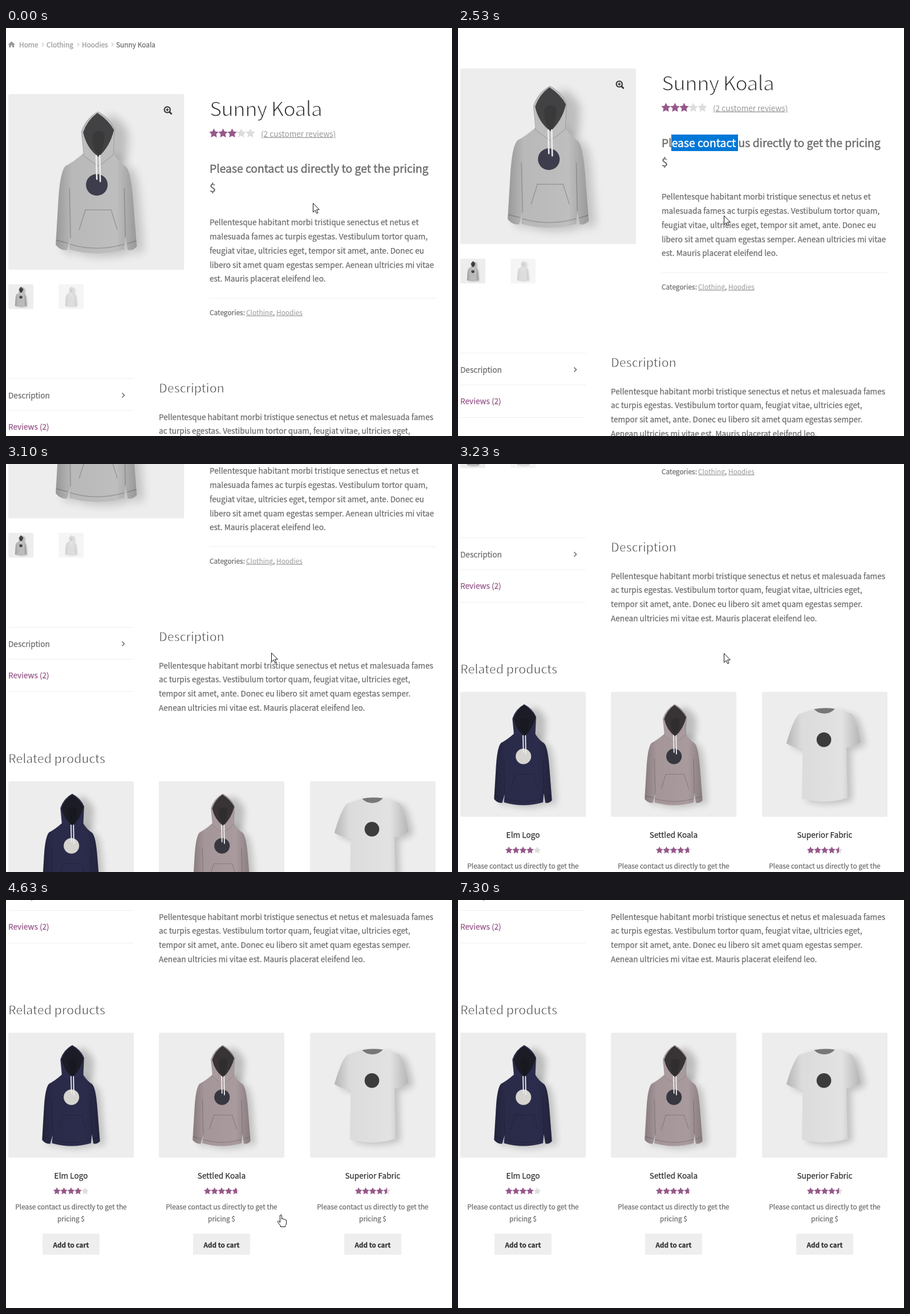
Animation of 782x716 px, one loop 7460 ms. Source, as an HTML page:

```html
<!DOCTYPE html>
<html lang="en">
<head>
<meta charset="utf-8">
<title>Product page</title>
<style>
html, body { margin: 0; width: 100%; height: 100%; overflow: hidden; background: #fff; }
svg { display: block; }
text { font-family: "Noto Sans CJK JP", "Noto Sans CJK SC", "Noto Sans CJK", "Open Sans", sans-serif; white-space: pre; stroke-width: .25px; }
/* A white outline thins the regular weight to a light one. */
.light { font-weight: 300; stroke: #fff; stroke-width: .035em; }
.medium { stroke-width: .5px; }
.link { text-decoration: underline; text-decoration-thickness: 1px; stroke: none; }
</style>
</head>
<body>
<svg id="stage" width="782" height="716" viewBox="0 0 782 716">
  <defs>
    <filter id="blur" x="-30%" y="-30%" width="160%" height="160%"><feGaussianBlur stdDeviation="8"/></filter>
    <linearGradient id="shade">
      <stop offset="0" stop-opacity=".2"/><stop offset=".2" stop-opacity=".03"/>
      <stop offset=".75" stop-opacity="0"/><stop offset="1" stop-opacity=".2"/>
    </linearGradient>
    <clipPath id="selectionClip"><rect id="selectionBox" x="374" y="232" width="0" height="29"/></clipPath>
  </defs>
  <g id="page"></g>
  <g id="cursor" stroke-linejoin="round">
    <path id="arrow" d="M.5.5V16.3L4.2 12.8 6.6 18.4 9 17.4 6.6 11.8H11.3Z" fill="#fff" stroke="#111"/>
    <path id="beam" d="M-3.5-7.5H-1L0-6.5 1-7.5H3.5M0-6.5V6.5M-3.5 7.5H-1L0 6.5 1 7.5H3.5" fill="none" stroke="#111" stroke-width="1.2"/>
    <path id="hand" d="M-1.5 14V2Q-1.5.5 0 .5T1.5 2V8Q2 6.8 3.2 7T4.4 8.6Q5 7.6 6 8T7.2 9.6Q8 8.8 9 9.4T9.6 11V15Q9.6 18 7.6 19.5V21.5H-.5V20L-5 14Q-6.2 12.2-5 11.4T-2.8 12.2Z" fill="#fff" stroke="#111"/>
  </g>
</svg>
<script>
const LOOP = 7460;
const BODY = 13.64, SMALL = 11.9, PRICE = 19.3, HEADING = 21.45;
const GREY = '#6d6d6d', PALE = '#999', DARK = '#333', PURPLE = '#96588a', RULE = '#f0f0f0';
const $ = id => document.getElementById(id);

const text = (x, y, size, fill, content, extra = '') =>
  `<text x="${x}" y="${y + .6}" font-size="${size}" fill="${fill}" stroke="${fill}" ${extra}>${content}</text>`;
const centred = (x, y, size, fill, content, extra = '') =>
  text(x, y, size, fill, content, 'text-anchor="middle" ' + extra);
const lines = (x, y, rows) =>
  rows.map((row, i) => text(x, y + i * 24.8, BODY, GREY, row)).join('');
const rule = (x, y, width) => `<rect x="${x}" y="${y}" width="${width}" height="1" fill="${RULE}"/>`;
const chevron = (x, y, size, color, weight) =>
  `<path d="M${x} ${y - size}l${size} ${size}l${-size} ${size}" fill="none" stroke="${color}" stroke-width="${weight}"/>`;

function stars(x, y, pitch, rating) {
  const radius = pitch * .54, id = `rating${x}`;
  let d = '';
  for (let s = 0; s < 5; s++) {
    for (let k = 0; k < 10; k++) {
      const r = k % 2 ? radius * .5 : radius, a = k * Math.PI / 5;
      const px = x + pitch * (s + .5) + r * Math.sin(a), py = y - r * Math.cos(a);
      d += `${k ? 'L' : 'M'}${px.toFixed(2)} ${py.toFixed(2)}`;
    }
    d += 'Z';
  }
  const stop = rating / 5;
  return `<linearGradient id="${id}"><stop offset="${stop}" stop-color="${PURPLE}"/>` +
    `<stop offset="${stop}" stop-color="#ddd"/></linearGradient><path d="${d}" fill="url(#${id})"/>`;
}

const picture = (x, y, size, content, opacity = 1) =>
  `<svg x="${x}" y="${y}" width="${size}" height="${size}" viewBox="0 0 308 308" opacity="${opacity}">
    <rect width="308" height="308" rx="${3 * 308 / size}" fill="#ededed"/>${content}</svg>`;

const shadow = (d, dx, opacity) =>
  `<path d="${d}" transform="translate(${dx} 6)" opacity="${opacity}" filter="url(#blur)"/>`;
const garment = (d, color) =>
  shadow(d, 12, .18) + `<path d="${d}" fill="${color}"/><path d="${d}" fill="url(#shade)"/>`;

function hoodie(color, lining, emblem = '') {
  const hood = 'M157 31Q136 42 128 66L132 108Q150 122 158 126Q170 118 184 106L186 62Q178 42 157 31Z';
  const body = 'M131 104Q114 119 100 126Q91 136 88 180L83 264Q92 275 103 273L109 252L107 272Q155 286 203 272' +
    'L205 250L209 273Q218 275 225 267L219 190Q215 136 206 127Q194 120 184 104Z';
  return shadow(hood, 24, .2) + garment(body, color) +
    `<path d="M107 165L109 252M203 165L205 250M124 238L135 203H180L191 238M108 263Q155 277 203 263M84 256L104 261M208 262L224 257"
       fill="none" stroke="#000" stroke-opacity=".2" stroke-width="1.5"/>
     <path d="${hood}" fill="${color}" stroke="#000" stroke-opacity=".18"/>
     <path d="M156 33Q138 46 131 67Q137 95 158 110Q178 92 185 63Q176 46 156 33Z" fill="${lining}"/>
     <path d="M158 110Q144 90 148 70Q156 60 168 68Q170 92 158 110Z" opacity=".14"/>${emblem}
     <path d="M154 108L155 149M160 108L161 153" stroke="#eee" stroke-width="2.6" stroke-linecap="round"/>`;
}

const tee = garment('M129 43Q105 50 91 55Q76 70 60 127Q76 138 100 141L98 263Q154 278 210 261L207 138Q228 135 242 124' +
    'Q234 76 220 54L178 42Q153 58 129 43Z', '#e2e2e2') +
  `<path d="M128 43Q153 38 179 42Q170 53 153 54Q136 53 128 43Z" fill="#777"/>
   <circle cx="152" cy="118" r="18" fill="#3c3c3c"/>`;

const disc = (color, r) => `<circle cx="155" cy="159" r="${r}" fill="${color}"/>`;
const greyHoodie = hoodie('#bebebe', '#424244', disc('#3d3d4d', 19));

function card(x, name, rating, content) {
  const cx = x + 110;
  return picture(x, 885.5, 220, content) +
    centred(cx, 1141.5, BODY, DARK, name) +
    stars(x + 79, 1164, 12.4, rating) +
    centred(cx, 1195.5, SMALL, GREY, 'Please contact us directly to get the') +
    centred(cx, 1216.5, SMALL, GREY, 'pricing $') +
    `<rect x="${x + 60}" y="1238.5" width="100" height="37" fill="#eee"/>` +
    centred(cx, 1262, 11.7, DARK, 'Add to cart', 'font-weight="600"');
}

const price = fill =>
  text(357, 253, PRICE, fill, 'Please contact us directly to get the pricing', 'class="medium"');

$('page').innerHTML = [
  `<path d="M3.5 29L9.7 23.5 16 29H14.2V34H11V30.5H8.5V34H5.3V29Z" fill="${PALE}"/>`,
  text(23, 33.5, SMALL, PALE, 'Home'), chevron(63, 29, 3, '#ccc', 1.2),
  text(71, 33.5, SMALL, PALE, 'Clothing'), chevron(125, 29, 3, '#ccc', 1.2),
  text(133, 33.5, SMALL, PALE, 'Hoodies'), chevron(185, 29, 3, '#ccc', 1.2),
  text(193, 33.5, SMALL, GREY, 'Sunny Koala'),

  picture(4, 116, 308.5, greyHoodie),
  `<g fill="none" stroke="#333" stroke-width="2"><circle cx="282.8" cy="143.4" r="5.2"/>
   <path d="M286.6 147.2L290.6 151.2" stroke-width="2.8"/><path d="M280.1 143.4h5.4M282.8 140.7v5.4" stroke-width="1.5"/></g>`,
  picture(4, 449.5, 44, greyHoodie),
  picture(92, 449.5, 44, hoodie('#c0c0c0', '#b4b4b4'), .5),

  text(357, 154.5, 35.8, DARK, 'Sunny Koala', 'class="light" letter-spacing="-1"'),
  stars(356.5, 185, 16, 3),
  text(447, 190, BODY, PALE, '(2 customer reviews)', 'class="link"'),
  price(GREY), text(357, 287.5, PRICE, GREY, '$', 'class="medium"'),
  '<g clip-path="url(#selectionClip)"><rect x="374" y="232" width="117" height="29" fill="#0078d7"/>',
  price('#fff'), '</g>',
  lines(357, 345.5, [
    'Pellentesque habitant morbi tristique senectus et netus et',
    'malesuada fames ac turpis egestas. Vestibulum tortor quam,',
    'feugiat vitae, ultricies eget, tempor sit amet, ante. Donec eu',
    'libero sit amet quam egestas semper. Aenean ultricies mi vitae',
    'est. Mauris placerat eleifend leo.']),
  rule(357, 473.5, 396),
  text(357, 503, SMALL, GREY, 'Categories:'),
  text(421, 503, SMALL, PALE, 'Clothing', 'class="link"'), text(468, 503, SMALL, GREY, ','),
  text(474, 503, SMALL, PALE, 'Hoodies', 'class="link"'),

  [615, 671, 728].map(y => rule(4, y, 220)).join(''),
  text(4, 649, BODY, GREY, 'Description'), chevron(203.5, 644.5, 4, GREY, 1.6),
  text(4, 704.5, BODY, PURPLE, 'Reviews (2)'),
  text(268, 639, HEADING, DARK, 'Description', 'class="light"'),
  lines(268, 687, [
    'Pellentesque habitant morbi tristique senectus et netus et malesuada fames',
    'ac turpis egestas. Vestibulum tortor quam, feugiat vitae, ultricies eget,',
    'tempor sit amet, ante. Donec eu libero sit amet quam egestas semper.',
    'Aenean ultricies mi vitae est. Mauris placerat eleifend leo.']),

  text(4, 853.5, HEADING, DARK, 'Related products', 'class="light"'),
  card(4, 'Elm Logo', 4, hoodie('#2b2c4b', '#1c1c26', disc('#d6d4d0', 19))),
  card(268, 'Settled Koala', 4.67, hoodie('#a99a9d', '#383436', disc('#37373f', 19))),
  card(533, 'Superior Fabric', 4.5, tee)
].join('');

// [time, offset]
const scrollKeys = [[0, 0], [2455, 0], [2530, 44], [2650, 170], [2750, 260], [2830, 300],
  [3070, 300], [3100, 328], [3370, 653], [LOOP, 653]];

// [time, x, y, shape shown from this time on]
const cursorKeys = [
  [0, 538, 307, 'arrow'], [20, 538, 307, 'arrow'], [130, 507, 328, 'arrow'], [390, 507, 328, 'arrow'],
  [850, 425, 262, 'beam'], [1130, 388, 252, 'beam'], [1730, 383.5, 260, 'beam'], [1900, 374, 252, 'beam'],
  [1920, 374, 252, 'beam'], [2130, 491, 248, 'beam'], [2160, 486, 262, 'arrow'], [2270, 466, 329, 'arrow'],
  [2830, 466, 329, 'arrow'], [3100, 465, 331, 'arrow'], [3350, 467, 332, 'beam'], [3400, 467, 332, 'beam'],
  [3480, 440, 370, 'hand'], [3830, 291, 540, 'hand'], [4230, 366, 542, 'hand'], [4360, 366, 542, 'hand'],
  [4630, 482, 552, 'hand'], [5100, 660, 552, 'hand'], [5130, 655, 554, 'hand'], [5470, 90, 560, 'hand'],
  [5720, 90, 560, 'hand'], [6250, 200, 560, 'hand'], [6350, 220, 585, 'arrow'], [6470, 227, 607, 'arrow'],
  [6500, 225, 612, 'arrow'], [6600, 157, 720, 'arrow'], [LOOP, 157, 720, 'arrow']];

function sample(keys, t) {
  const i = keys.findIndex(key => key[0] > t);
  const a = keys[i - 1], b = keys[i], p = (t - a[0]) / (b[0] - a[0]);
  return a.map((v, k) => typeof v === 'number' ? v + (b[k] - v) * p : v);
}

function draw(now) {
  const t = now % LOOP;
  const [, scroll] = sample(scrollKeys, t);
  const [, x, y, shape] = sample(cursorKeys, t);
  $('page').setAttribute('transform', `translate(0 ${-Math.round(scroll)})`);
  $('cursor').setAttribute('transform', `translate(${Math.round(x)} ${Math.round(y)})`);
  for (const id of ['arrow', 'beam', 'hand']) $(id).style.display = id === shape ? '' : 'none';
  const selected = t < 1920 ? 0 : t < 2130 ? x - 374 : 117;
  $('selectionBox').setAttribute('width', Math.max(0, selected));
  requestAnimationFrame(draw);
}
requestAnimationFrame(draw);
</script>
</body>
</html>
```
